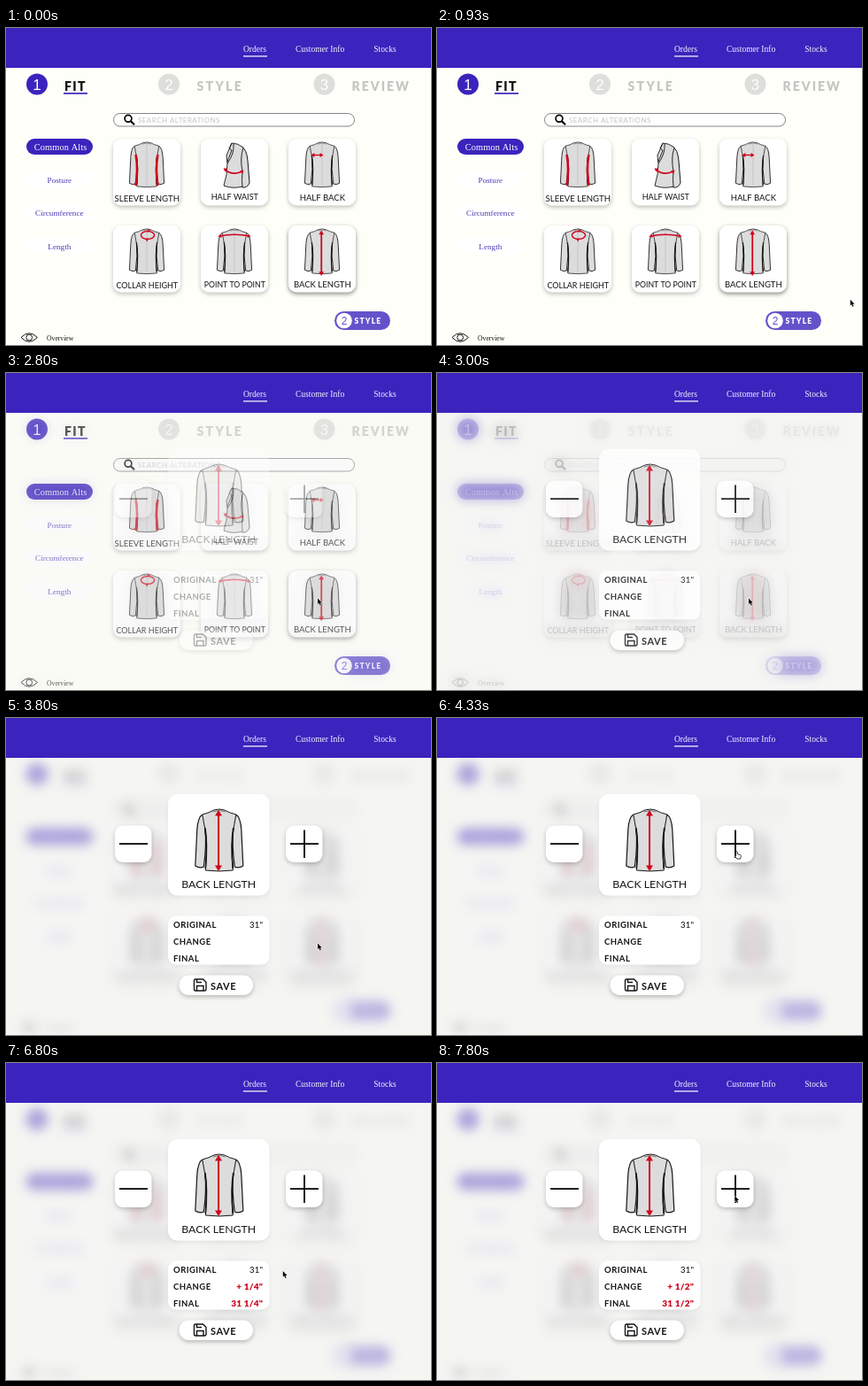
These frames come from a looping animation (480 px wide and 358 px high, 8 s). An HTML page with a canvas:

```html
<!DOCTYPE html>
<html lang="en">
<head>
<meta charset="utf-8">
<title>Alterations</title>
<style>
html, body { margin: 0; width: 100%; height: 100%; overflow: hidden; background: #fffff9; }
canvas { display: block; width: 480px; height: 358px; }
</style>
</head>
<body>
<canvas id="stage" width="480" height="358"></canvas>
<script>
(() => {
const W = 480, H = 358, LOOP = 8000;
const PURPLE = '#3a24bd', RED = '#d0021b', CREAM = '#fffff9', INK = '#151515';
const SERIF = '"Liberation Serif", "Times New Roman", serif';
const SANS = 'Lato, "Open Sans", sans-serif';
const DIGIT = '"Liberation Sans", Arial, sans-serif';
const stage = document.getElementById('stage').getContext('2d');

function layer(draw) {
  const c = document.createElement('canvas');
  c.width = W;
  c.height = H;
  draw(c.getContext('2d'));
  return c;
}

function text(g, str, x, y, size, { font = SANS, weight = 400, color = INK, align = 'left', gap = 0 } = {}) {
  g.font = `${weight} ${size}px ${font}`;
  g.fillStyle = color;
  g.textAlign = align;
  g.letterSpacing = gap + 'px';
  g.fillText(str, align === 'right' ? x + gap : align === 'center' ? x + gap / 2 : x, y);
}

function box(g, x, y, w, h, r, fill, shadow) {
  g.save();
  if (shadow) {
    g.shadowColor = `rgba(0,0,0,${shadow})`;
    g.shadowBlur = 5;
    g.shadowOffsetY = 2;
  }
  g.fillStyle = fill;
  g.beginPath();
  g.roundRect(x, y, w, h, r);
  g.fill();
  g.restore();
}

function disc(g, x, y, r, fill) {
  g.fillStyle = fill;
  g.beginPath();
  g.arc(x, y, r, 0, 7);
  g.fill();
}

function line(g, d, color, width, fill) {
  const p = new Path2D(d);
  if (fill) {
    g.fillStyle = fill;
    g.fill(p);
  }
  g.strokeStyle = color;
  g.lineWidth = width;
  g.stroke(p);
}

function head(g, x, y, angle, s) {
  g.save();
  g.translate(x, y);
  g.rotate(angle);
  g.fillStyle = RED;
  g.fill(new Path2D(`M0 0L${-1.3 * s} ${-s * .8}V${s * .8}Z`));
  g.restore();
}

function arrow(g, x1, y1, x2, y2, width, s) {
  const a = Math.atan2(y2 - y1, x2 - x1);
  const dx = Math.cos(a) * s, dy = Math.sin(a) * s;
  line(g, `M${x1 + dx} ${y1 + dy}L${x2 - dx} ${y2 - dy}`, RED, width);
  head(g, x1, y1, a + Math.PI, s);
  head(g, x2, y2, a, s);
}

// Back view of a jacket, centred on x with its collar at y
function jacket(g, x, y, k) {
  g.save();
  g.translate(x, y);
  g.scale(k, k);
  g.lineJoin = 'round';
  const body = 'M-19 7Q-11 5 -6 2Q0 0 6 2Q11 5 19 7L16 24Q13 40 15.5 70Q0 72 -15.5 70Q-13 40 -16 24Z';
  const sleeve = 'M-19 7Q-24 10 -25 24L-27 65Q-22 68 -17.5 66Q-14 42 -16 23';
  for (const side of [-1, 1]) {
    g.save();
    g.scale(side, 1);
    line(g, sleeve, INK, 1.2, '#dcdcdc');
    g.restore();
  }
  line(g, body, INK, 1, '#dcdcdc');
  line(g, 'M-15.5 68Q-13 40 -16 22M15.5 68Q13 40 16 22', INK, 1.7);
  line(g, 'M-7 4Q0 1 7 4', '#666', .8);
  line(g, 'M0 3V70', '#aaa', .6);
  g.restore();
}

function halfFront(g) {
  g.lineJoin = 'round';
  line(g, 'M266 134Q272 137 273 150L275 175Q272 181 267 180L263 176L265 152Z', INK, 1, '#dcdcdc');
  line(g, 'M255 130Q262 130 268 135Q264 147 267 162Q266 172 267 179Q256 182 246 178Q250 166 250 153L249 144Z', INK, .9, '#dcdcdc');
  line(g, 'M255 130L252 136L255 138L250 151M257 131Q258 142 250 153', INK, .9);
  line(g, 'M247 160Q256 167 267 162', RED, 1.6);
  head(g, 245.5, 158.5, -2.6, 3);
  head(g, 268.5, 160.5, -.7, 3);
}

const cards = [
  ['SLEEVE LENGTH', 121, 125, 195.5, 9.6, g => {
    line(g, 'M146.6 143Q149.5 160 146.5 178M171.4 143Q168.5 160 171.5 178', RED, 2.5);
  }],
  ['HALF WAIST', 220, 125, 194, 9.1, halfFront],
  ['HALF BACK', 319, 125, 194.5, 9.5, g => arrow(g, 344.5, 143.5, 358.5, 143.5, 1.4, 3)],
  ['COLLAR HEIGHT', 121, 223, 293.5, 9, g => {
    g.strokeStyle = RED;
    g.lineWidth = 1.4;
    g.beginPath();
    g.ellipse(160, 234, 7.6, 4.4, 0, 0, 7);
    g.stroke();
    head(g, 163, 229.5, .3, 2.6);
    head(g, 157, 238.5, 3.4, 2.6);
  }],
  ['POINT TO POINT', 220, 223, 292.5, 8.7, g => {
    line(g, 'M241 235Q258 231.5 275 235', RED, 1.6);
    head(g, 239.5, 235.5, 2.9, 2.8);
    head(g, 276.5, 235.5, .25, 2.8);
  }],
  ['BACK LENGTH', 319, 223, 293, 9.5, g => arrow(g, 356.2, 228.5, 356.2, 280, 1.7, 3.6)],
];

function page(g) {
  g.fillStyle = CREAM;
  g.fillRect(0, 0, W, H);

  [['1', 35, 'FIT', 66, 1.3], ['2', 184, 'STYLE', 215.5, 2.3], ['3', 359.5, 'REVIEW', 390.5, 2]].forEach(([n, x, label, tx, gap], i) => {
    disc(g, x, 63.5, 12, i ? '#dededb' : PURPLE);
    text(g, n, x, 69.5, 17, { font: DIGIT, color: '#fff', align: 'center' });
    text(g, label, tx, 70.5, 14, { weight: 900, color: i ? '#c6c6c3' : INK, gap });
  });
  g.fillStyle = PURPLE;
  g.fillRect(65, 73, 27, 1.7);

  box(g, 121.5, 96.5, 272, 14.5, 7.2, '#fff');
  g.strokeStyle = '#666';
  g.lineWidth = .8;
  g.stroke();
  g.strokeStyle = '#000';
  g.lineWidth = 1.7;
  g.beginPath();
  g.arc(138, 102.3, 3.9, 0, 7);
  g.stroke();
  line(g, 'M141 105.3L145 109.3', '#000', 2.2);
  text(g, 'SEARCH ALTERATIONS', 149, 106.5, 8, { color: '#c4c4c4', gap: .45 });

  box(g, 23, 125, 75, 18, 9, PURPLE);
  text(g, 'Common Alts', 61.5, 137.5, 10.4, { font: SERIF, color: '#fff', align: 'center', gap: .1 });
  ['Posture', 'Circumference', 'Length'].forEach((s, i) => {
    const y = 174.5 + 37.5 * i;
    box(g, 23, y - 12.5, 75, 18, 9, '#fff');
    text(g, s, 60.3, y, 9.2, { font: SERIF, color: '#4a3cb5', align: 'center' });
  });

  cards.forEach(([label, x, y, base, size, mark], i) => {
    box(g, x, y, 76, 75.5, 9, '#fff', i === 5 ? .45 : .25);
    if (i !== 1) jacket(g, x + 38, y + 3.2, .725);
    mark(g);
    text(g, label, x + 38.3, base, size, { align: 'center' });
  });

  box(g, 371, 320, 63, 21, 10.5, '#6353cb');
  disc(g, 382, 330.5, 8.8, '#fff');
  text(g, '2', 382, 334.7, 12, { font: DIGIT, color: '#6353cb', align: 'center' });
  text(g, 'STYLE', 393.5, 333.8, 8.5, { weight: 900, color: '#fff', gap: 1.2 });

  line(g, 'M17 349.5Q26 340 35.5 349.5Q26 359 17 349.5Z', INK, 1);
  g.beginPath();
  g.arc(26.2, 349.5, 3.4, 0, 7);
  g.stroke();
  text(g, 'Overview', 46, 352.5, 7.7, { font: SERIF });
}

function header(g) {
  g.fillStyle = PURPLE;
  g.fillRect(0, 0, W, 45);
  for (const [s, x] of [['Orders', 268], ['Customer Info', 327], ['Stocks', 415.3]])
    text(g, s, x, 27, 9.5, { font: SERIF, color: '#f4f2ff' });
  g.fillStyle = '#fff';
  g.fillRect(268, 31.3, 27, 1.2);
}

function dialog(g) {
  box(g, 183, 86, 114.5, 114.5, 11, '#fff', .06);
  jacket(g, 240.8, 102, 1);
  arrow(g, 240, 104, 240, 173, 1.9, 5);
  text(g, 'BACK LENGTH', 240.2, 192, 12.3, { align: 'center' });

  box(g, 123, 121.5, 41.5, 41.5, 9, '#fff', .22);
  box(g, 316, 121.5, 41.5, 41.5, 9, '#fff', .22);
  line(g, 'M128 142.2H160M321 142.2H353M337 126.5V158', '#000', 1.8);

  box(g, 183, 223.5, 114.5, 55, 9, '#fff', .06);
  ['ORIGINAL', 'CHANGE', 'FINAL'].forEach((s, i) =>
    text(g, s, 189, 237 + 18.8 * i, 9.5, { weight: 700, gap: .45 }));
  text(g, '31"', 290, 237, 9.5, { weight: 500, align: 'right', gap: .2 });

  box(g, 195.5, 290.5, 83.5, 22.5, 11.2, '#fff', .25);
  line(g, 'M214 295H222.5L226 298.5V306Q226 308 224 308H214Q212.5 308 212.5 306V297Q212.5 295 214 295ZM215.5 308V302.5H223V308M215.5 295V298.5H221', INK, 1.4);
  text(g, 'SAVE', 231, 306.5, 11, { weight: 700, gap: .6 });
}

function amount(g, value, alpha) {
  if (alpha <= 0) return;
  g.globalAlpha = alpha;
  const style = { weight: 900, color: RED, align: 'right', gap: .2 };
  text(g, `+ ${value}"`, 290, 255.8, 10, style);
  text(g, `31 ${value}"`, 290, 274.6, 10, style);
  g.globalAlpha = 1;
}

const sharp = layer(page);
const nav = layer(header);
const modal = layer(dialog);
const soft = layer(g => {
  g.fillStyle = CREAM;
  g.fillRect(0, 0, W, H);
  g.filter = 'blur(6.5px)';
  g.drawImage(sharp, 0, 0);
  g.filter = 'none';
  g.fillStyle = 'rgba(238,238,237,.56)';
  g.fillRect(0, 0, W, H);
});

const clamp = v => Math.max(0, Math.min(1, v));
const ramp = (t, a, b) => clamp((t - a) / (b - a));

// time, x, y of the pointer tip
const route = [
  [600, 472, 328], [1400, 458, 271], [1730, 424, 273.5], [2200, 352, 254.5],
  [3800, 352, 254.5], [4330, 338.5, 150.5], [5730, 337.5, 151],
  [6470, 312.8, 235], [6800, 312.8, 235], [7600, 336.3, 150],
];
const ARROW = 'M0 0V6.6L1.5 5.3L2.6 7.9L3.8 7.4L2.7 4.9H4.8Z';
const HAND = 'M-.9 .6Q0 -.4 .8 .6V3.2L4.2 4Q5 4.4 4.8 5.6L4 8.6H.4L-2.2 5.4Q-2 4.2 -.9 5Z';

function pointer(g, t) {
  if (t < 600 || (t >= 5470 && t < 5530)) return;
  let i = 0;
  while (i < route.length - 2 && t >= route[i + 1][0]) i++;
  const [t0, x0, y0] = route[i], [t1, x1, y1] = route[i + 1];
  const u = ramp(t, t0, t1), e = u * u * (3 - 2 * u);
  g.save();
  g.translate(x0 + (x1 - x0) * e, y0 + (y1 - y0) * e);
  g.lineJoin = 'round';
  if (t >= 4250 && t < 5470) {
    line(g, HAND, '#111', .8, '#fff');
  } else {
    line(g, ARROW, '#fff', 1);
    g.fillStyle = '#000';
    g.fill(new Path2D(ARROW));
  }
  g.restore();
}

function render(t) {
  const g = stage;
  const shown = ramp(t, 2670, 3070);
  g.globalAlpha = 1;
  g.drawImage(sharp, 0, 0);
  if (shown) {
    g.globalAlpha = shown;
    g.drawImage(soft, 0, 0);
    g.drawImage(modal, 0, 0);
    g.globalAlpha = 1;
  }
  g.drawImage(nav, 0, 0);
  const second = ramp(t, 7620, 7790);
  amount(g, '1/4', ramp(t, 4820, 5000) * (1 - second));
  amount(g, '1/2', second);
  pointer(g, t);
}

const start = performance.now();
function tick(now) {
  render(Math.max(0, now - start) % LOOP);
  requestAnimationFrame(tick);
}
render(0);
requestAnimationFrame(tick);
})();
</script>
</body>
</html>
```
